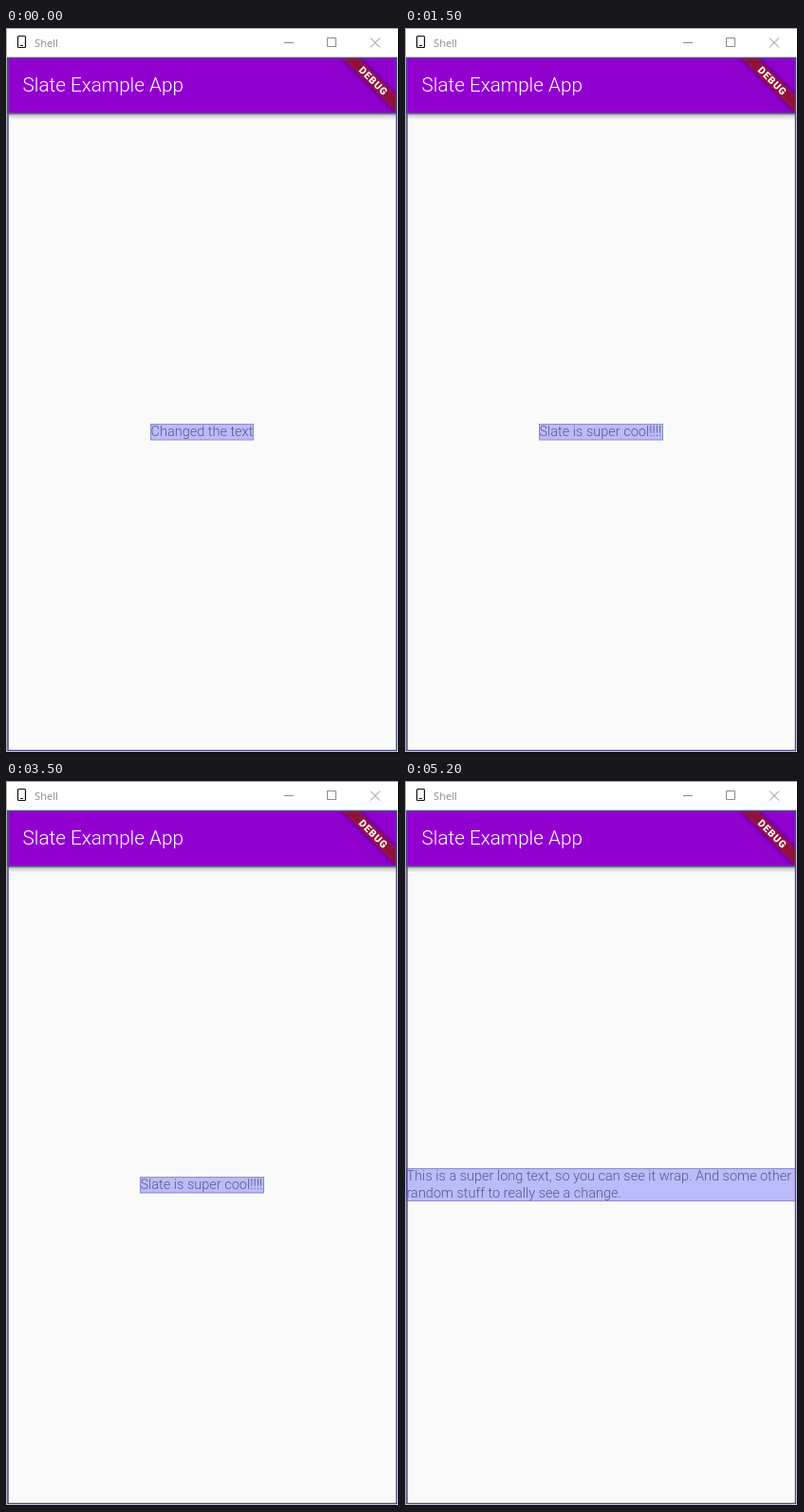
Write an HTML page that moves like this. It is 414 px wide and 764 px high and loops after 5.5 s.

```html
<!DOCTYPE html>
<html lang="en">
<head>
<meta charset="utf-8">
<title>Text change demo</title>
<style>
  html, body { margin: 0; width: 100%; height: 100%; overflow: hidden; background: #fafafa; }
  svg { display: block; width: 414px; height: 764px; }
  text { font-family: Roboto, sans-serif; }
  .caption { font: 11.2px "Open Sans", sans-serif; fill: #8c8c8c; }
  .title { font-size: 20.7px; font-weight: 300; fill: #fff; }
  .banner { font-size: 10.2px; font-weight: 900; fill: #fff; letter-spacing: .8px; }
  .label { font-size: 14.5px; font-weight: 300; fill: #585889; }
  .controls { fill: none; stroke: #8c8c8c; }
  .outline { fill: none; stroke: #4e4e88; stroke-width: 1.6; }
</style>
</head>
<body>
<svg viewBox="0 0 414 764">
  <defs>
    <filter id="soft" x="-50%" y="-150%" width="200%" height="400%"><feGaussianBlur stdDeviation="3"/></filter>
    <linearGradient id="shade" x2="0" y2="1">
      <stop stop-color="#000" stop-opacity=".42"/>
      <stop offset=".4" stop-color="#000" stop-opacity=".14"/>
      <stop offset="1" stop-color="#000" stop-opacity="0"/>
    </linearGradient>
    <clipPath id="bar"><rect x="1" y="31" width="411" height="59"/></clipPath>
  </defs>

  <!-- Page -->
  <rect width="414" height="764" fill="#fafafa"/>
  <rect x="2" y="90" width="410" height="7" fill="url(#shade)"/>

  <!-- Window caption -->
  <rect width="414" height="31" fill="#fff"/>
  <rect x="12.5" y="8.5" width="8" height="12" rx="1" fill="#fff" stroke="#111" stroke-width="1.2"/>
  <path d="M15 18.5h3" stroke="#111"/>
  <text class="caption" x="30" y="20">Shell</text>
  <path class="controls" d="M293 15.5h10M338.5 10.5h9v9h-9zM384 10.5l10 10M394 10.5l-10 10"/>

  <!-- App bar -->
  <g clip-path="url(#bar)">
    <rect x="1" y="31" width="411" height="59" fill="#9200d0"/>
    <text class="title" x="17.5" y="67">Slate Example App</text>
    <g transform="translate(412 31) rotate(45) scale(1.035)">
      <rect x="-40" y="28" width="80" height="12" opacity=".5" filter="url(#soft)"/>
      <rect x="-40" y="28" width="80" height="12" fill="#b71c1c" fill-opacity=".627"/>
      <text class="banner" x="0" y="37.6" text-anchor="middle">DEBUG</text>
    </g>
  </g>

  <!-- Selected text -->
  <rect id="box" fill="#bbbbfc" stroke="#8c8cc4"/>
  <text class="label" id="first"></text>
  <text class="label" id="second"></text>

  <!-- Inspector outlines and window frame -->
  <rect class="outline" x="2" y="31.5" width="409.5" height="730"/>
  <path class="outline" d="M2 89.7H411.5"/>
  <path d="M.5 0V764M0 .5H414" stroke="#aaa" fill="none"/>
  <path d="M413.5 0V764M0 763.5H414" stroke="#000" fill="none"/>
</svg>
<script>
const LOOP = 5500;
const states = [
  { at: 0, x: 152, width: 109, lines: ["Changed the text"] },
  { at: 100, x: 161, width: 91, lines: ["Check this out"] },
  { at: 1500, x: 141, width: 131, lines: ["Slate is super cool!!!!"] },
  { at: 3800, x: 57, width: 299, lines: ["This is a super long text, so you can see it wrap"] },
  { at: 5200, x: 1, width: 411, lines: [
    "This is a super long text, so you can see it wrap. And some other",
    "random stuff to really see a change."] },
];
const box = document.getElementById("box");
const rows = ["first", "second"].map(id => document.getElementById(id));
const setAttributes = (node, values) => {
  for (const key in values) node.setAttribute(key, values[key]);
};

let shown;
function show(state) {
  if (state === shown) return;
  shown = state;
  const { x, width, lines } = state;
  const top = lines.length > 1 ? 408 : 417;
  setAttributes(box, { x: x + .5, y: top + .5, width: width - 1, height: lines.length * 17.5 - 1 });
  rows.forEach((row, i) => {
    row.textContent = lines[i] || "";
    setAttributes(row, { x: x + .5, y: top + 13 + i * 18 });
  });
}

function tick(now) {
  const time = now % LOOP;
  show(states.findLast(state => state.at <= time));
  requestAnimationFrame(tick);
}
show(states[0]);
requestAnimationFrame(tick);
</script>
</body>
</html>
```
